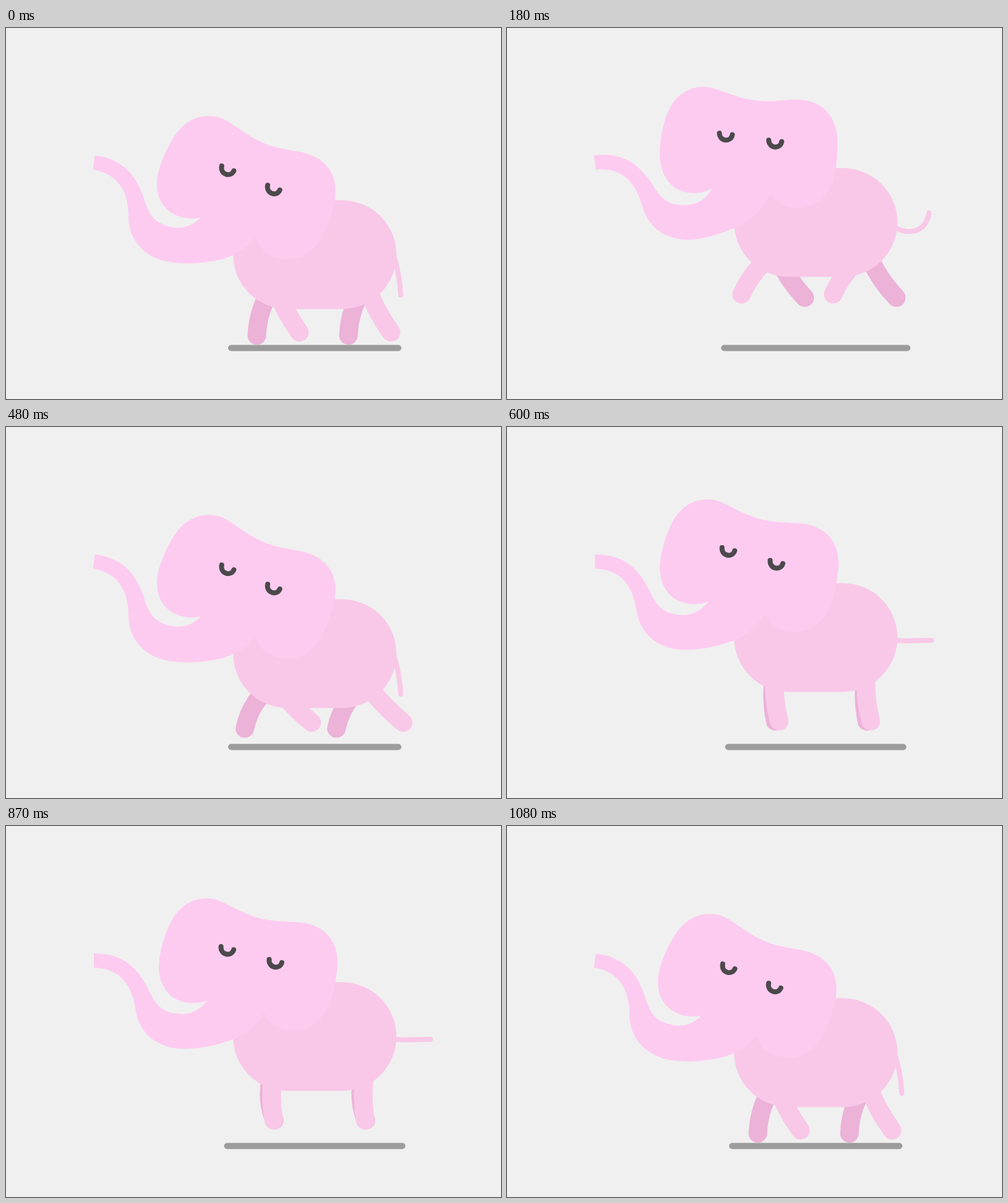
Animation of 800 by 600 pixels, one loop 1.11 s. Source, as an HTML page:

```html
<!DOCTYPE html>
<html lang="en">
<head>
<meta charset="utf-8">
<title>Walking elephant</title>
<style>
  html, body { margin: 0; width: 100%; height: 100%; overflow: hidden; background: #f0f0f0; }
  svg { display: block; width: 100%; height: 100%; }
  path { stroke-linecap: round; }
  .leg { fill: none; stroke-width: 30; }
  .dark { stroke: #ecb2d8; }
  .light { stroke: #f9c8e8; }
  .eye { fill: none; stroke: #4b494b; stroke-width: 8; }
</style>
</head>
<body>
<svg viewBox="0 0 800 600">
  <path id="shadow" stroke="#9c9c9c" stroke-width="10"/>
  <g id="body">
    <path class="leg dark"/>
    <path class="leg dark" />
    <path id="tail" fill="none" stroke="#f9c8e8" stroke-width="8"/>
    <rect x="367" y="278.5" width="264" height="176" rx="88" fill="#f9c8e8"/>
    <path class="leg light"/>
    <path class="leg light"/>
  </g>
  <g id="head">
    <path fill="#fdcbf0" d="M142 206C190 206 213 230 230 264C241 288 251 303 284 304
      C303 304 317 294 325 282C319 285 311 286.5 302 286.5C266 286 247 260 247 228
      C247 204 259 167 270 149C285 125 305 117 326 117C355 117 383 151 441 154
      C470 156 480 154 500 162C524 173 536 194 536 222C534 250 529 272 523 287
      C512 316 490 331 466 331C440 331 428 321 417 302C402 327 378 341 367 345
      C340 355 315 360 290 360.5C247 361 214 337 209 294C202 252 180 230 142 229Z"/>
    <path class="eye" d="M347.5 195c-1 14 17 17 20.5 5"/>
    <path class="eye" d="M425.3 215.8c-1 14 17 17 20.5 5"/>
  </g>
</svg>
<script>
const LOOP = 1110, STEP = 30, STRIDE = 540;
const $ = id => document.getElementById(id);
const dark = document.querySelectorAll('.dark');
const light = document.querySelectorAll('.light');

// Tail curve hanging, level and curled up
const tails = [
  [626, 366, 632, 386, 636.5, 404, 638, 432],
  [626, 371, 646, 372.5, 666, 371.5, 686, 371],
  [626, 374, 650, 388, 677, 382, 682, 351]
];

const smooth = (from, to, t) => {
  const x = Math.min(1, Math.max(0, (t - from) / (to - from)));
  return x * x * (3 - 2 * x);
};
const swing = a => Math.cos(a) + 0.06 * Math.cos(3 * a);

function tailPath(lift) {
  const i = lift < 0.5 ? 0 : 1, k = lift * 2 - i;
  const [x, y, ...rest] = tails[i].map((v, n) => v + (tails[i + 1][n] - v) * k);
  return `M${x} ${y}C${rest}`;
}

function poseLegs(legs, angle, bend) {
  legs.forEach((leg, i) => {
    leg.setAttribute('d', `M0 0Q${-2 * bend} 43 0 87`);
    leg.setAttribute('transform', `translate(${434 + 148 * i} 415) rotate(${-angle})`);
  });
}

function draw(time) {
  const t = Math.floor(time % LOOP / STEP) * STEP % STRIDE;
  const a = t / STRIDE * 2 * Math.PI;
  const lift = smooth(0, 120, t) - smooth(270, 390, t);
  const tilt = 1 - 2 * lift;

  $('shadow').setAttribute('d', `M${364 - 13 * lift} 517.5H${634 + 13 * lift}`);
  $('body').setAttribute('transform', `translate(0 ${-52 * lift})`);
  $('head').setAttribute('transform', `rotate(${7.4 * tilt + 0.4 * tilt * tilt} 142 217.5)`);
  $('tail').setAttribute('d', tailPath(lift));
  poseLegs(light, 1.5 + 40 * swing(a + 0.8), 4.1 - 0.9 * Math.cos(a) + 1.2 * Math.sin(a));
  poseLegs(dark, -0.3 - 32 * swing(a + 0.873), 6.6 - 3 * Math.sin(a));
}

const start = performance.now();
function tick() {
  draw(performance.now() - start);
  requestAnimationFrame(tick);
}
tick();
</script>
</body>
</html>
```
